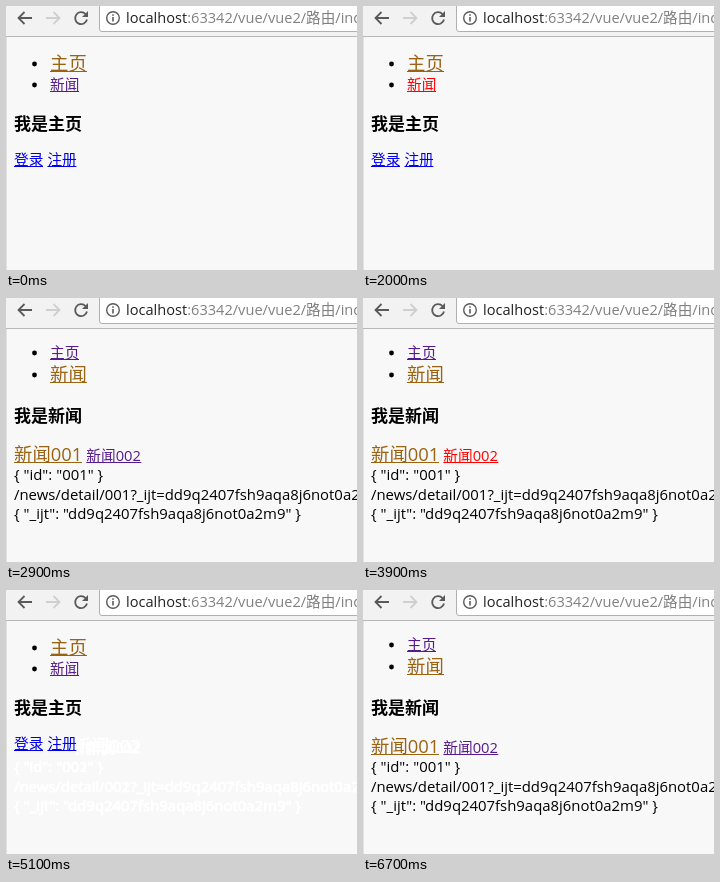
These frames come from a looping animation (351 px wide and 264 px high, 7300 ms). An HTML page:

```html
<!DOCTYPE html>
<html lang="zh-CN">
<head>
<meta charset="utf-8">
<title>Router demo</title>
<style>
html, body { margin: 0; width: 100%; height: 100%; overflow: hidden; background: #f8f8f8; }
svg { display: block; width: 351px; height: 264px; }
text { font-family: "Open Sans", "Noto Sans CJK SC", "Noto Sans CJK", sans-serif; white-space: pre; }
#ghost text { stroke: #fff; stroke-width: .6; }
</style>
</head>
<body>
<svg viewBox="0 0 351 264">
  <rect width="351" height="264" fill="#f8f8f8"/>
  <rect y="30" width="1" height="234" fill="#e2e2e2"/>
  <rect width="351" height="30" fill="#f2f2f2"/>
  <rect y="30" width="351" height="1" fill="#b8b8b8"/>
  <path d="M93.5 -2V23Q93.5 25.5 96 25.5H353V-2Z" fill="#fff" stroke="#b0b0b0"/>
  <rect id="hover" x="63" y="3" width="24" height="21" rx="2" fill="#dcdcdc"/>
  <g fill="none" stroke="#5a5a5a" stroke-width="1.8">
    <path d="M26 12H13M18.5 6L12.5 12L18.5 18"/>
    <path d="M40 12H53M47.5 6L53.5 12L47.5 18" stroke="#cfcfcf"/>
    <path d="M79.5 8A6 6 0 1 0 81 13.5"/>
    <path d="M82 5V11H76Z" fill="#5a5a5a" stroke="none"/>
    <circle cx="107" cy="12" r="6.3" stroke-width="1.4"/>
    <path d="M107 11V15.5M107 8.2V9.8" stroke-width="1.6"/>
  </g>
  <text x="120" y="17" font-size="14.6" fill="#222">localhost<tspan fill="#808080">:63342/vue/vue2/路由/index.html</tspan></text>
  <g id="ghost"></g>
  <g id="page"></g>
</svg>
<script>
const LOOP = 7300, SMALL = 14.7, BIG = 18.4, BODY = 14.9, GAP = 4;
const VISITED = '#551a8b', FRESH = '#0000ee', ACTIVE = '#996312', PRESSED = '#ff0000';
const TOKEN = 'dd9q2407fsh9aqa8j6not0a2m9';

// start time, view, pressed link, extra
const steps = [
  [0, 'home'], [500, 'home', '', 'hover'], [900, 'home'], [2000, 'home', '新闻'],
  [2100, 'news'], [2800, 'news', '新闻001'],
  [2900, '001'], [3900, '001', '新闻002'],
  [4100, '002'], [4400, '002', '新闻001'],
  [4500, '001'], [5000, '001', '主页'],
  [5100, 'home', '', 'ghost'], [5600, 'home', '新闻', 'ghost'],
  [5700, 'news', '', 'ghost'], [6100, 'news', '新闻002', 'ghost'],
  [6200, '002'], [6700, '001']
];

const byId = id => document.getElementById(id);
const page = byId('page'), ghost = byId('ghost'), hover = byId('hover');

function add(parent, tag, attrs, content = '') {
  const el = document.createElementNS('http://www.w3.org/2000/svg', tag);
  for (const name in attrs) el.setAttribute(name, attrs[name]);
  el.textContent = content;
  return parent.appendChild(el);
}

function write(parent, x, y, content, fill = '#000', size = SMALL, weight = 400) {
  return add(parent, 'text', { x, y, fill, 'font-size': size, 'font-weight': weight }, content);
}

// Returns the x where the next link starts.
function link(x, y, label, { active, pressed, color = VISITED }) {
  const fill = pressed === label ? PRESSED : active ? ACTIVE : color;
  const width = write(page, x, y, label, fill, active ? BIG : SMALL).getComputedTextLength();
  add(page, 'rect', { x, y: y + 1, width: Math.round(width), height: 1, fill });
  return x + width + GAP;
}

function details(parent, id, fill) {
  const lines = [`{ "id": "${id}" }`, `/news/detail/${id}?_ijt=${TOKEN}`, `{ "_ijt": "${TOKEN}" }`];
  lines.forEach((line, i) => write(parent, 8, Math.round(182 + 19.5 * i), line, fill, BODY));
}

function draw(view, pressed) {
  page.textContent = '';
  const home = view === 'home', open = view.startsWith('00');
  for (const cy of home ? [58, 79] : [55, 77]) add(page, 'circle', { cx: 28.5, cy, r: 2.4 });
  link(44, home ? 64 : 60, '主页', { active: home, pressed });
  link(44, home ? 84 : 83, '新闻', { active: !home, pressed });
  write(page, 8, 124, home ? '我是主页' : '我是新闻', '#000', 17, 700);

  let x = 8;
  if (home) {
    for (const label of ['登录', '注册']) x = link(x, 159, label, { color: FRESH });
  } else {
    for (const id of ['001', '002'])
      x = link(x, open ? 163 : 159, '新闻' + id, { active: view === id, pressed });
  }
  if (open) details(page, view);
}

write(ghost, 80, 163, '新闻002', '#fff');
write(ghost, 66.5, 163, '新闻002', '#fff', BIG);
details(ghost, '001', '#fff');
details(ghost, '002', '#fff');

let shown;
function tick() {
  const t = performance.now() % LOOP;
  const step = steps.findLast(s => s[0] <= t);
  if (step !== shown) {
    const [, view, pressed, extra] = shown = step;
    draw(view, pressed);
    hover.style.display = extra === 'hover' ? '' : 'none';
    ghost.style.display = extra === 'ghost' ? '' : 'none';
  }
  requestAnimationFrame(tick);
}
tick();
</script>
</body>
</html>
```
